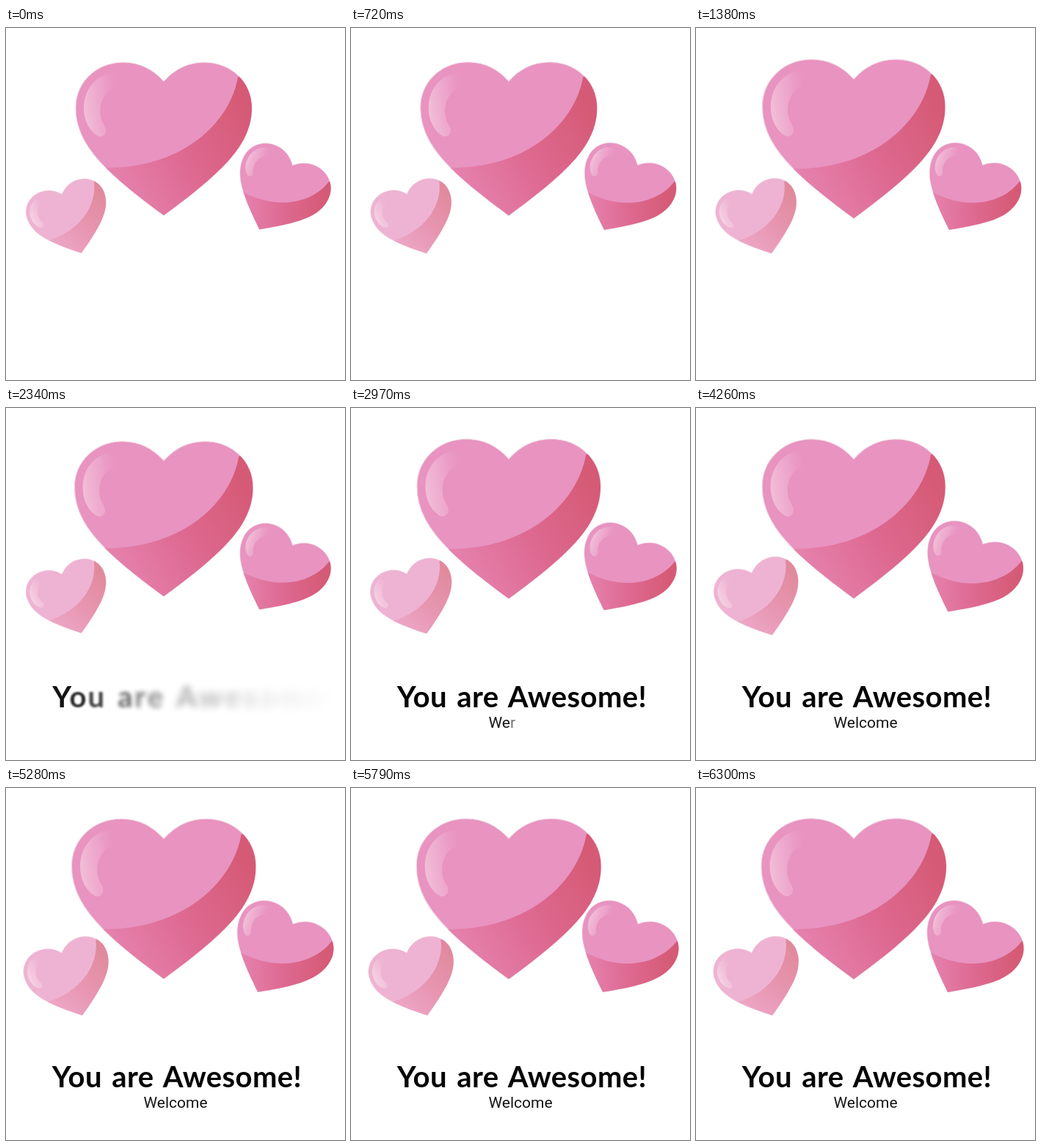
Recreate the animation shown at these times as an HTML page. Size 462 by 481 pixels, loop 6.33 s.

```html
<!DOCTYPE html>
<html lang="en">
<head>
<meta charset="utf-8">
<style>
  html, body { margin: 0; width: 100%; height: 100%; overflow: hidden; background: #fff; }
  main { position: relative; width: 100%; height: 100%; overflow: clip; contain: strict; }
  svg, div { position: absolute; left: 0; top: 0; white-space: pre; }
  span { position: relative; }
  #title { top: 369.5px; left: 4px; width: 458px; text-align: center; font: 700 40px/48px Lato, sans-serif; letter-spacing: .4px; word-spacing: 3.3px; color: #050505; }
  #note { top: 418px; left: 187.5px; font: 21px/25px Roboto, sans-serif; color: #151515; }
</style>
</head>
<body>
<main>
<svg width="462" height="481" viewBox="0 0 462 481">
  <defs>
    <linearGradient id="side" gradientUnits="userSpaceOnUse" x1="140" y1="225" x2="330" y2="115">
      <stop offset="0" stop-color="#e685b1"/>
      <stop offset=".5" stop-color="#de6a92"/>
      <stop offset="1" stop-color="#d55a75"/>
    </linearGradient>
    <linearGradient id="shine" gradientUnits="userSpaceOnUse" x1="104" y1="106" x2="160" y2="98">
      <stop offset="0" stop-color="#f5cfe0" stop-opacity=".75"/>
      <stop offset=".5" stop-color="#f3bedb" stop-opacity=".4"/>
      <stop offset="1" stop-color="#e893c0" stop-opacity="0"/>
    </linearGradient>
    <path id="outline" d="M215 73C200 56 181 47 160 47C123 47 95 74 95 109C95 141 112 167 136 191C160 215 188 236 215 256C242 236 270 215 294 191C318 167 335 141 335 109C335 74 307 47 270 47C249 47 230 56 215 73Z"/>
    <clipPath id="inside"><use href="#outline"/></clipPath>
    <g id="heart">
      <use href="#outline" fill="#e893c0" stroke="#f3d3e0" stroke-width="1"/>
      <path clip-path="url(#inside)" fill="url(#side)" d="M316 67C306 128 242 192 135 191L130 270H345V60Z"/>
      <path fill="url(#shine)" d="M158 61C128 58 106 80 106 109C106 128 115 142 126 148C135 150 139 141 134 133C122 115 130 86 150 82C164 79 170 62 158 61Z"/>
    </g>
  </defs>
  <g id="big"><use href="#heart"/></g>
  <g id="left" opacity=".7"><use href="#heart" transform="translate(76.2 227) rotate(-18.2) scale(.463) translate(-215 -73)"/></g>
  <g id="right"><use href="#heart" transform="translate(390.5 187.7) rotate(27.3) scale(.538) translate(-215 -73)"/></g>
</svg>
<div id="title"></div>
<div id="note"><span></span><span></span></div>
</main>
<script>
const LOOP = 6330, BEAT = 524, BEAT_START = 205, LAG = 58;
const TITLE_START = 1765, STAGGER = 34, REVEAL = 600;
const NOTE = 'Welcome', NOTE_START = 2500, PER_LETTER = 190;
const LETTERS = 'gapyondretiscuqm';

const byId = id => document.getElementById(id);
const clamp = v => Math.min(1, Math.max(0, v));
const [typed, pending] = byId('note').children;

const glyphs = [...'You are Awesome!'].map(letter => {
  const span = document.createElement('span');
  span.textContent = letter;
  byId('title').append(span);
  return span;
});

function scaleAbout(id, x, y, s) {
  byId(id).setAttribute('transform', `translate(${x} ${y}) scale(${s}) translate(${-x} ${-y})`);
}

function drawHearts(t) {
  const beat = Math.max(0, t - BEAT_START) / BEAT;
  const lagged = Math.max(0, t - BEAT_START - LAG) / BEAT;
  const soft = (1 - Math.cos(2 * Math.PI * lagged)) / 2;
  scaleAbout('big', 215, 151.5, 1 + .055 * Math.abs(Math.sin(Math.PI * beat)));
  scaleAbout('left', 81.5, 256.7, 1 + .066 * soft);
  scaleAbout('right', 381, 217, 1 + .064 * soft);
}

function drawTitle(t) {
  glyphs.forEach((span, i) => {
    const p = clamp((t - TITLE_START - i * STAGGER) / REVEAL), rest = 1 - p;
    span.style.left = 50 * rest ** 1.4 + 'px';
    span.style.opacity = p ** 1.6;
    span.style.filter = rest ? `blur(${10 * rest}px)` : 'none';
  });
}

// The letter being typed flickers through stand-ins while it fades in.
function drawNote(t) {
  const pos = (t - NOTE_START) / PER_LETTER, done = Math.floor(pos);
  const active = pos >= 0 && done < NOTE.length;
  typed.textContent = NOTE.slice(0, Math.max(0, done));
  pending.textContent = active ? LETTERS[Math.floor(t / 60) * 7 % LETTERS.length] : '';
  pending.style.opacity = active ? .25 + .75 * (pos - done) : 0;
}

function frame(now) {
  const t = now % LOOP;
  drawHearts(t);
  drawTitle(t);
  drawNote(t);
  requestAnimationFrame(frame);
}
frame(0);
</script>
</body>
</html>
```
